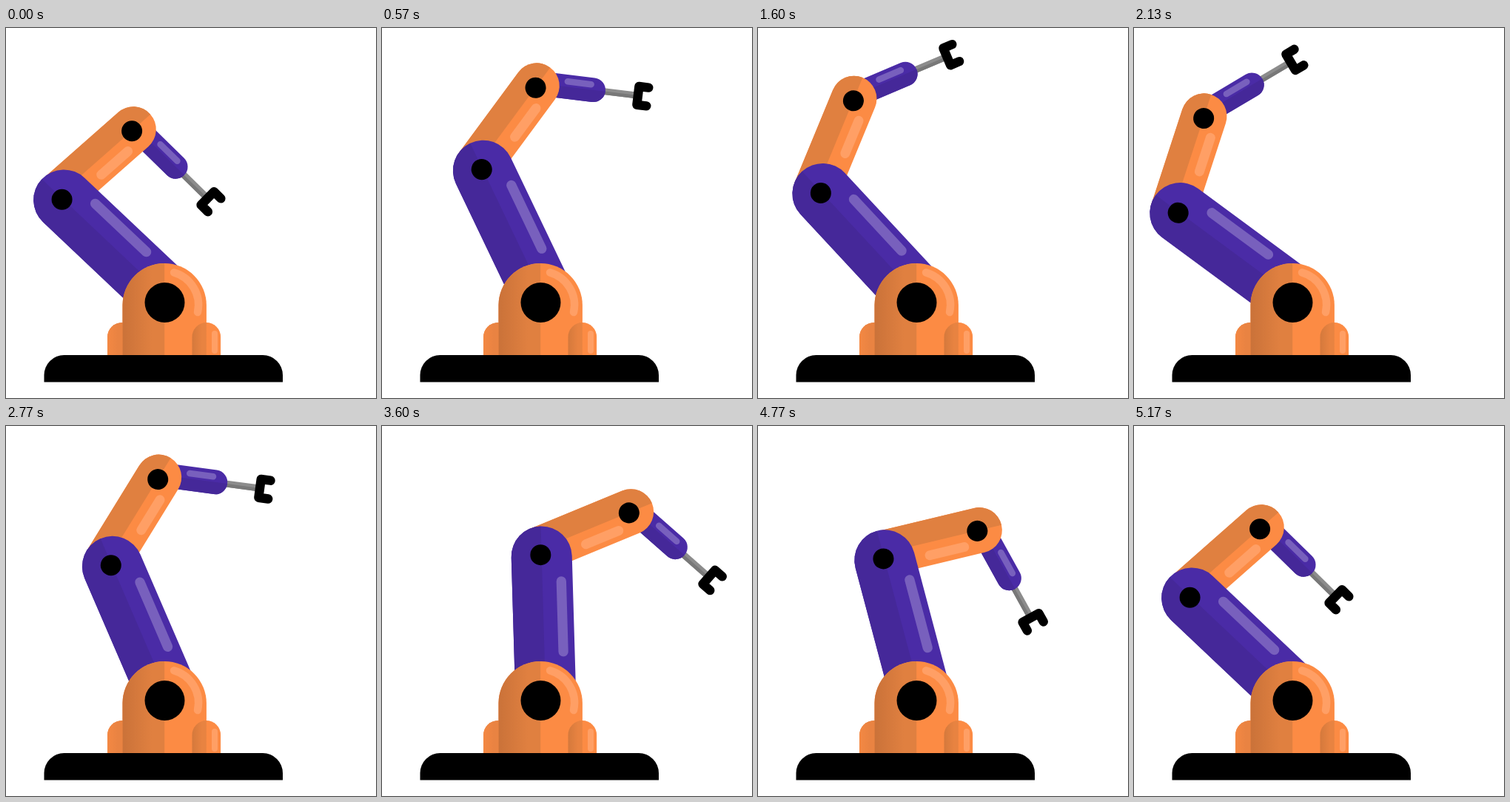
Write an HTML page that moves like this. It is 500 px wide and 500 px high and loops after 5.21 s.

```html
<!DOCTYPE html>
<html lang="en">
<head>
<meta charset="utf-8">
<title>Robot arm</title>
<style>
  html, body { margin: 0; width: 100%; height: 100%; overflow: hidden; background: #fff; }
  svg { display: block; width: 100vw; height: 100vh; }
  .line { fill: none; stroke-linecap: round; stroke-linejoin: round; }
</style>
</head>
<body>
<svg id="stage" viewBox="0 0 500 500"></svg>
<script>
const ORANGE = ['#fc8b44', '#e08040', '#ff9f65'];
const PURPLE = ['#4a2ba6', '#452899', '#7860bd'];

const line = (d, color, width) =>
  `<path class="line" d="${d}" stroke="${color}" stroke-width="${width}"/>`;
const disc = (x, y, r) => `<circle cx="${x}" cy="${y}" r="${r}"/>`;
const gradient = (id, from, to) =>
  `<linearGradient id="${id}"><stop stop-color="${from}"/>
    <stop offset=".7" stop-color="${to}"/></linearGradient>`;

// Capsule along y, shaded on one side (-1 left, 1 right)
function link(x, top, bottom, r, [light, dark], side) {
  const sweep = side > 0 ? 1 : 0;
  return line(`M${x} ${top}V${bottom}`, light, 2 * r) +
    `<path fill="${dark}" d="M${x} ${top - r}A${r} ${r} 0 0 ${sweep} ${x + side * r} ${top}
      V${bottom}A${r} ${r} 0 0 ${sweep} ${x} ${bottom + r}Z"/>`;
}

// Upright block with a rounded top, standing on the plinth
function block(x, r, top, light, dark) {
  const y = top + r;
  return `<path fill="${light}" d="M${x - r} 443V${y}A${r} ${r} 0 0 1 ${x + r} ${y}V443Z"/>
    <path fill="${dark}" d="M${x - r} 443V${y}A${r} ${r} 0 0 1 ${x} ${top}V443Z"/>`;
}

const wrist = `
  <g id="wrist">
    ${line('M-2.2 -78V-134', '#8c8c8c', 9)}
    ${line('M0 -78V-134', '#787878', 4.5)}
    ${line('M-14.5 -149.6V-136.6H10.5V-149.6', '#000', 12.4)}
    ${link(-2.4, -75.8, -10, 16.4, PURPLE, 1)}
    ${line('M-9.5 -72V-40', PURPLE[2], 8.5)}
  </g>`;

const forearm = `
  <g id="forearm">
    ${wrist}
    <g transform="rotate(3)">
      ${link(-7.3, -135, 0, 30.8, ORANGE, -1)}
      ${line('M10 -110V-62', ORANGE[2], 13)}
    </g>
    ${disc(0, -132.3, 14)}
  </g>`;

const upper = `
  <g id="upper">
    ${forearm}
    <g transform="rotate(-1.6)">
      ${link(6.8, -194.2, 0, 41, PURPLE, -1)}
      ${line('M32.4 -160V-65', PURPLE[2], 13.3)}
    </g>
    ${disc(0, -196.6, 14)}
  </g>`;

const base =
  gradient('domeShade', '#ca7239', ORANGE[1]) +
  gradient('sideShade', '#f48843', '#e98342') +
  gradient('frontShade', '#d4793c', '#e88341') +
  block(157, 20, 398, '#e98342', 'url(#sideShade)') +
  block(214.2, 56.7, 318, ORANGE[0], 'url(#domeShade)') +
  line('M227 330.5A45.5 45.5 0 0 1 259 384', ORANGE[2], 10.5) +
  disc(214.5, 371, 27) +
  block(270.8, 19.3, 398, ORANGE[0], 'url(#frontShade)') +
  line('M282 413V436', ORANGE[2], 8) +
  '<path d="M51.5 478.5V469A27 27 0 0 1 78.5 442H347A27 27 0 0 1 374 469V478.5Z"/>';

document.getElementById('stage').innerHTML = upper + base;

// Joint angles in degrees: shoulder, elbow, wrist
const HOME = [-45, 90.6, 88.8];
const MOVES = [
  { start: 60, end: 820, pose: [-16.9, 46.2, 55] },
  { start: 1187, end: 1841, pose: [-52, 67.1, 44.2] },
  { start: 2333, end: 2800, pose: [-21.4, 50.2, 69.3] },
  { start: 3259, end: 3989, pose: [25.7, 82.1, 63.7] },
  { start: 4365, end: 5125, pose: HOME },
];
const LOOP = 5210;

function poseAt(t) {
  let pose = HOME;
  for (const { start, end, pose: next } of MOVES) {
    const x = Math.min(1, Math.max(0, (t - start) / (end - start)));
    const s = x * x * (3 - 2 * x);
    pose = pose.map((angle, i) => angle + (next[i] - angle) * s);
  }
  return pose;
}

// The wrist turns slightly beyond the forearm's hole
const joints = [['upper', 214.6, 370.8], ['forearm', 0, -196.6], ['wrist', 0, -136.8]]
  .map(([id, x, y]) => ({ node: document.getElementById(id), x, y }));

const began = performance.now();
function draw() {
  const pose = poseAt((performance.now() - began) % LOOP);
  joints.forEach(({ node, x, y }, i) =>
    node.setAttribute('transform', `translate(${x} ${y}) rotate(${pose[i]})`));
  requestAnimationFrame(draw);
}
draw();
</script>
</body>
</html>
```
